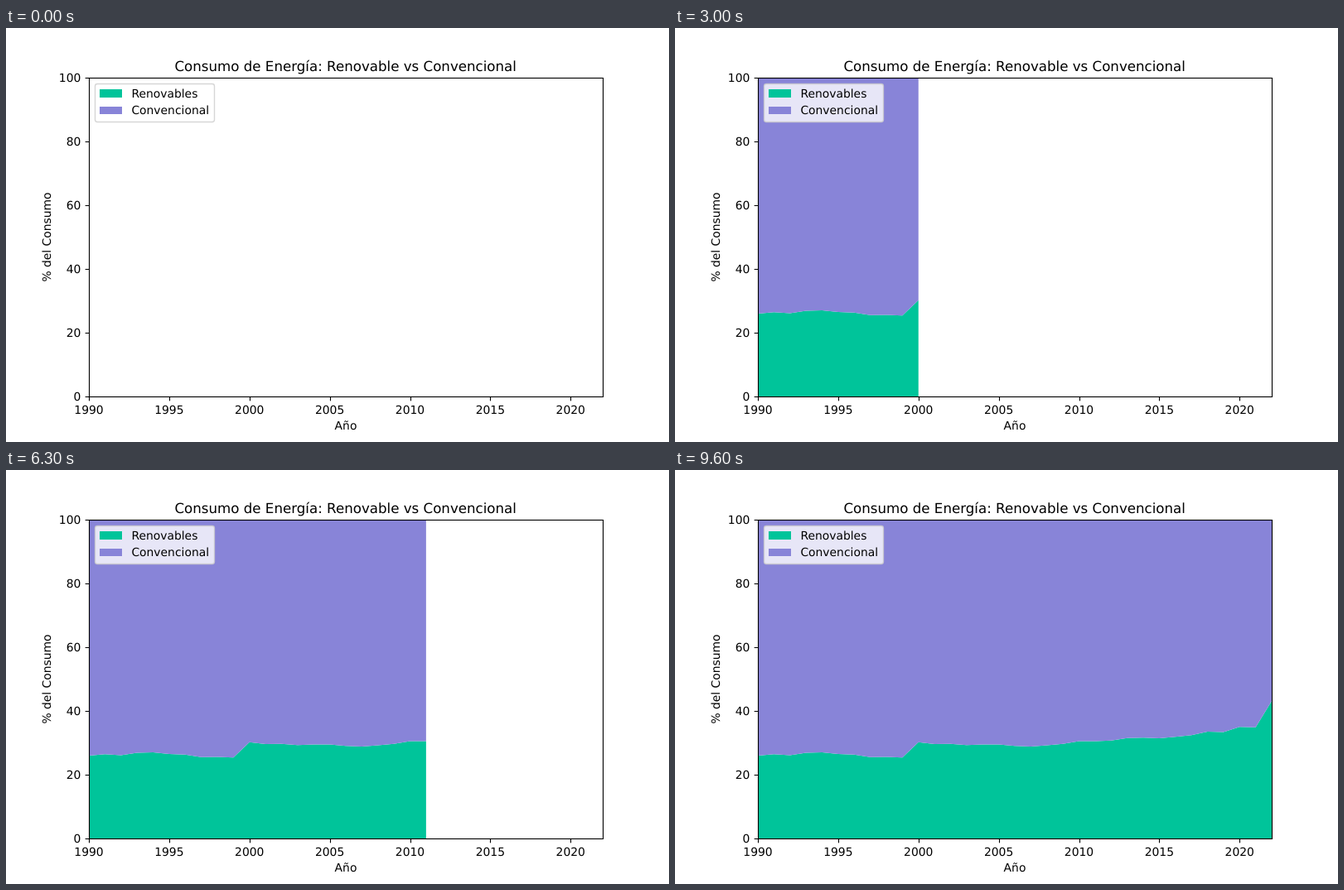
Write an HTML page that moves like this. It is 800x500 px and loops after 9.9 s.

```html
<!DOCTYPE html>
<html lang="es">
<head>
<meta charset="utf-8">
<title>Consumo de Energía</title>
<style>
  html, body { margin: 0; width: 100%; height: 100%; overflow: hidden; background: #fff; }
  svg { display: block; }
  text { font: 13.889px "DejaVu Sans", sans-serif; text-rendering: geometricPrecision; }
  .title { font-size: 16.667px; }
  .line { fill: none; stroke: #000; stroke-width: 1.111; }
</style>
</head>
<body>
<svg width="800" height="500" viewBox="0 0 800 500">
  <polygon id="renewable" fill="#00c49a"/>
  <polygon id="conventional" fill="#8884d8"/>
  <g id="ticks"></g>
  <rect class="line" x="100.5" y="60.5" width="620" height="385"/>

  <text class="title" x="409.7" y="52" text-anchor="middle">Consumo de Energía: Renovable vs Convencional</text>
  <text x="410" y="485" text-anchor="middle">Año</text>
  <text transform="translate(54 252.5) rotate(-90)" text-anchor="middle">% del Consumo</text>

  <rect x="107.5" y="67.5" width="144" height="46" rx="2.78" fill="#fff" fill-opacity=".8"
        stroke="#ccc" stroke-opacity=".8" stroke-width="1.389"/>
  <rect x="113" y="74" width="27" height="10" fill="#00c49a"/>
  <rect x="113" y="95" width="27" height="9" fill="#8884d8"/>
  <text x="151.4" y="84">Renovables</text>
  <text x="151.4" y="104">Convencional</text>
</svg>
<script>
  const STEP = 300, FIRST = 1990, TOP = 60, BOTTOM = 445;

  // Renewable share in percent, one value per year
  const share = [
    26.0, 26.4, 26.1, 26.9, 27.0, 26.5, 26.3, 25.5, 25.6, 25.4,
    30.2, 29.6, 29.7, 29.3, 29.5, 29.5, 29.0, 28.8, 29.2, 29.7,
    30.5, 30.5, 30.7, 31.5, 31.6, 31.4, 31.9, 32.4, 33.5, 33.4,
    35.0, 34.9, 43.1
  ];

  const xOf = year => 100 + (year - FIRST) * 19.375;
  const yOf = percent => BOTTOM - percent * 3.85;
  const byId = id => document.getElementById(id);
  const renewable = byId("renewable");
  const conventional = byId("conventional");

  function add(tag, attrs, label = "") {
    const node = document.createElementNS("http://www.w3.org/2000/svg", tag);
    for (const name in attrs) node.setAttribute(name, attrs[name]);
    node.textContent = label;
    byId("ticks").append(node);
  }

  for (let year = FIRST; year <= 2020; year += 5) {
    const x = xOf(year);
    add("path", { class: "line", d: `M${Math.round(x) + 0.5} 445.5v4.86` });
    add("text", { x, y: 466, "text-anchor": "middle" }, year);
  }
  for (let percent = 0; percent <= 100; percent += 20) {
    const y = yOf(percent);
    add("path", { class: "line", d: `M100.5 ${y + 0.5}h-4.86` });
    add("text", { x: 90.3, y: y + 5, "text-anchor": "end" }, percent);
  }

  let shown = -1;

  function draw(last) {
    const edge = share.slice(0, last + 1).map((v, i) => `${xOf(FIRST + i)},${yOf(v)}`).join(" ");
    const right = xOf(FIRST + last);
    const area = y => last ? `100,${y} ${edge} ${right},${y}` : "";
    renewable.setAttribute("points", area(BOTTOM));
    conventional.setAttribute("points", area(TOP));
  }

  function tick() {
    const index = Math.floor(performance.now() / STEP) % share.length;
    if (index !== shown) draw(shown = index);
    requestAnimationFrame(tick);
  }
  tick();
</script>
</body>
</html>
```
